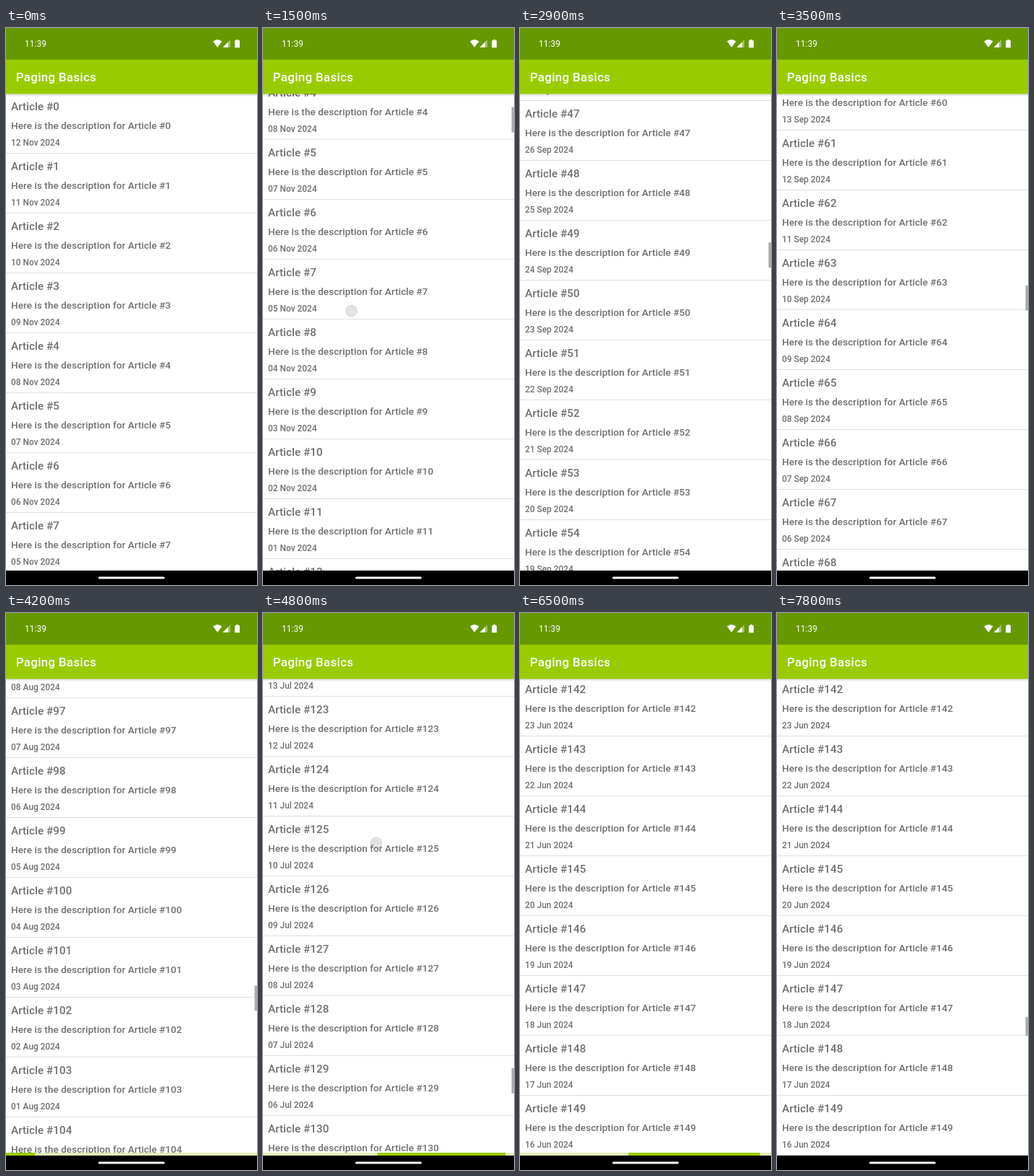
These frames come from a looping animation (348x772 px, 8000 ms). An HTML page with a canvas:

```html
<!DOCTYPE html>
<html lang="en">
<head>
<meta charset="utf-8">
<title>Paging Basics</title>
<style>
  html, body { margin: 0; width: 100%; height: 100%; overflow: hidden; background: #fff; }
  canvas { display: block; width: 348px; height: 772px; }
</style>
</head>
<body>
<canvas id="stage" width="348" height="772"></canvas>
<script>
const ctx = document.getElementById('stage').getContext('2d');
const W = 348, LIST_TOP = 91, LIST_H = 661, ROW = 83;
const LOOP = 8000, STEP = 100;
const LOAD_START = 4000, LOAD_END = 7000, SCROLL_START = 1050, SCROLL_END = 5450;

// [end time, scroll offset, ease-out power]: drags are linear, flings slow down
const moves = [
  [SCROLL_START, 0, 1],
  [1500, 351, 1], [1600, 440, 1], [2200, 900, 2],
  [2400, 1244, 1], [3500, 5012, 2],
  [3750, 5012, 1], [3950, 5390, 1], [4650, 9880, 2],
  [4800, 10184, 1], [SCROLL_END, 11789.5, 2],
];
// [start, end, x0, y0, x1, y1]
const drags = [
  [1080, 1600, 108, 712, 126, 316],
  [2200, 2400, 120, 650, 150, 306],
  [3750, 3950, 125, 660, 150, 300],
  [4650, 4850, 130, 640, 166, 212],
];

const clamp = v => Math.min(1, Math.max(0, v));
const mix = (a, b, k) => a + (b - a) * k;
const smooth = (p, start, length) => 0.5 - 0.5 * Math.cos(Math.PI * clamp((p - start) / length));

function rect(x, y, w, h, color) {
  ctx.fillStyle = color;
  ctx.fillRect(x, y, w, h);
}

function shape(path, color) {
  ctx.fillStyle = color;
  ctx.fill(new Path2D(path));
}

function text(str, x, y, size, color, weight = 500, spacing = 0.04) {
  ctx.font = `${weight} ${size}px Roboto, sans-serif`;
  ctx.letterSpacing = spacing + 'px';
  ctx.fillStyle = color;
  ctx.fillText(str, x, y);
}

function scrollAt(t) {
  let from = 0, start = 0;
  for (const [end, to, power] of moves) {
    if (t < end) return mix(from, to, 1 - (1 - (t - start) / (end - start)) ** power);
    from = to;
    start = end;
  }
  return from;
}

function dateOf(i) {
  const d = new Date(2024, 10, 12 - i);
  const month = 'Jan Feb Mar Apr May Jun Jul Aug Sep Oct Nov Dec'.split(' ')[d.getMonth()];
  return `${String(d.getDate()).padStart(2, '0')} ${month} ${d.getFullYear()}`;
}

function drawList(scroll) {
  const last = Math.floor((scroll + LIST_H) / ROW);
  for (let i = Math.floor(scroll / ROW); i <= last; i++) {
    const y = LIST_TOP + Math.round(i * ROW - scroll);
    const title = `Article #${i}`;
    text(title, 7, y + 23, 15.24, '#6f6f6f');
    text(`Here is the description for ${title}`, 7, y + 48.5, 13.55, '#6f6f6f');
    text(dateOf(i), 7, y + 71.7, 11.85, '#6f6f6f');
    rect(0, y + 82, W, 1, '#dfdfdf');
  }
}

function drawScrollbar(t, scroll) {
  const reloaded = t >= LOAD_END;
  const alpha = reloaded ? 1 : t < SCROLL_START ? 0 : 1 - clamp((t - SCROLL_END - 300) / 250);
  const ratio = 660 / ((reloaded ? 200 : 150) * ROW);
  ctx.globalAlpha = alpha;
  rect(344.6, LIST_TOP + scroll * ratio, 3.4, 660 * ratio, '#ababab');
  ctx.globalAlpha = 1;
}

function drawProgress(t) {
  if (t < LOAD_START || t >= LOAD_END) return;
  const p = (t - LOAD_START) / 1715 % 1;
  const bar = (head, tail) => rect(tail * W, 748, (head - tail) * W, 4, '#99cc00');
  rect(0, 748, W, 4, '#e2f1b8');
  bar(smooth(p, 0, 0.529), smooth(p, 0.2066, 0.55));
  bar(smooth(p, 0.55, 0.33), smooth(p, 0.7, 0.3));
}

function drawTouch(t) {
  for (const [start, end, x0, y0, x1, y1] of drags) {
    if (t < start || t > end) continue;
    const k = (t - start) / (end - start);
    ctx.globalAlpha = t === end ? 0.5 : 1;
    ctx.beginPath();
    ctx.arc(mix(x0, x1, k), mix(y0, y1, k), 8, 0, 7);
    ctx.fillStyle = 'rgba(150,150,155,.27)';
    ctx.fill();
    ctx.strokeStyle = 'rgba(120,120,120,.2)';
    ctx.lineWidth = 1;
    ctx.stroke();
    ctx.globalAlpha = 1;
  }
}

function drawBars() {
  const shadow = ctx.createLinearGradient(0, LIST_TOP, 0, LIST_TOP + 4);
  shadow.addColorStop(0, 'rgba(0,0,0,.16)');
  shadow.addColorStop(1, 'rgba(0,0,0,0)');
  rect(0, LIST_TOP, W, 4, shadow);
  rect(0, 0, W, 91.4, '#99cc00');
  rect(0, 0, W, 43.8, '#669900');
  text('11:39', 26, 26, 11.85, '#fff', 400, 0.12);
  text('Paging Basics', 13.7, 74, 16.93, '#fff', 500, 0.32);

  shape('M287 18.6Q293.2 13.6 299.5 18.6L293.2 26.8Z', '#fff');
  shape('M311 16.2V26.8H300.6Z', 'rgba(255,255,255,.4)');
  shape('M308 19.4V26.8H300.6Z', '#fff');
  shape('M317.3 17.3H319.2V16.1H322.2V17.3H324V27.2H317.3Z', '#fff');

  rect(0, 752, W, 20, '#000');
  ctx.beginPath();
  ctx.roundRect(128, 760.4, 92, 3.2, 1.6);
  ctx.fillStyle = '#fff';
  ctx.fill();
}

function frame(now) {
  const t = Math.floor(now % LOOP / STEP) * STEP;
  const scroll = scrollAt(t);
  rect(0, 0, W, 772, '#fff');
  drawList(scroll);
  drawScrollbar(t, scroll);
  drawProgress(t);
  drawBars();
  drawTouch(t);
  requestAnimationFrame(frame);
}
requestAnimationFrame(frame);
</script>
</body>
</html>
```
